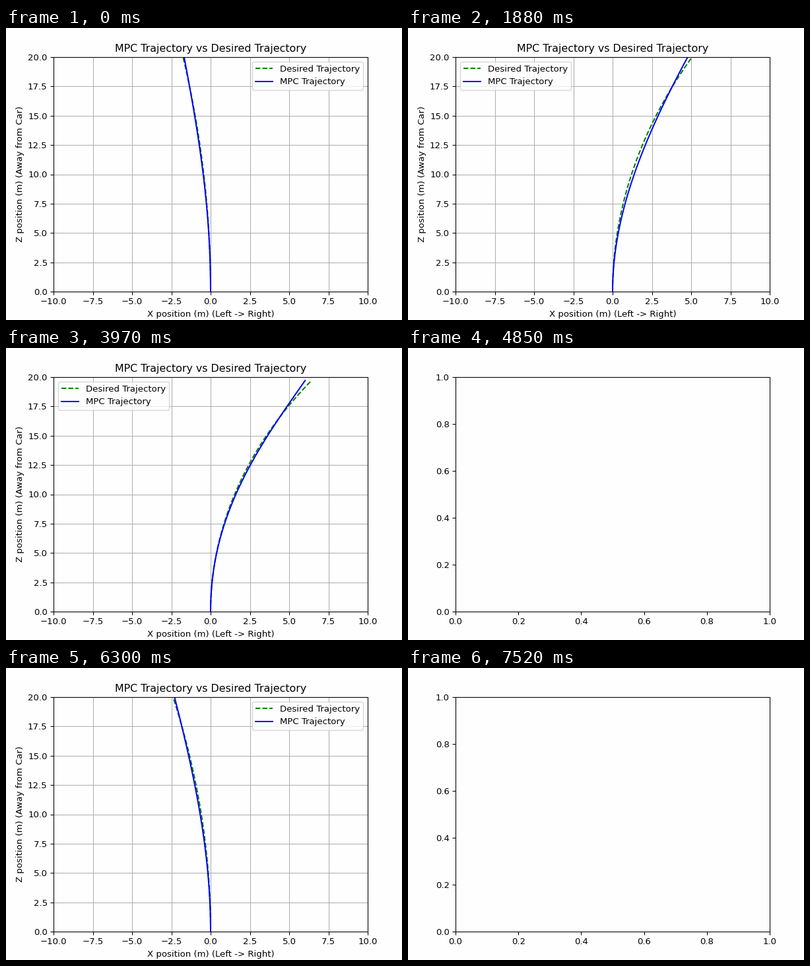
A matplotlib script for the animation above (7.55 s loop, 600 by 442 pixels).

```python
import numpy as np
import matplotlib.pyplot as plt
from matplotlib.animation import FuncAnimation

W, H, DPI = 600, 442, 96
LOOP, STEP = 7550, 25
BACK = "#fefefe"
BLANK = 30          # ms the cleared axes stay visible
LENGTH = 20.94      # metres of path shown

plt.rcParams.update({"font.family": "DejaVu Sans", "font.size": 9.9,
                     "axes.facecolor": BACK, "figure.facecolor": BACK})

# Redraw bursts: start, end, number of switches, first state, last state
BURSTS = [
    (90, 760, 14, 0, 1), (850, 1550, 13, 0, 1), (1640, 2390, 15, 0, 1),
    (2480, 3210, 13, 0, 0), (3240, 3970, 13, 1, 1), (4000, 4730, 13, 0, 0),
    (4790, 5450, 13, 1, 1), (5550, 6300, 15, 0, 1), (6360, 7090, 16, 0, 1),
    (7180, 7520, 9, 0, 0),
]

# Path curvature over time (s, 1/m), level at both ends
KEY_T = np.array([0, 1.88, 2.91, 3.97, 6.30, 7.55])
KEY_K = np.array([-0.0087, 0.0237, 0.0419, 0.0299, -0.0118, -0.0130])
KEY_D = np.gradient(KEY_K, KEY_T)
KEY_D[[0, -1]] = 0


def curvature(t):
    """Smooth cubic Hermite through the key curvatures."""
    i = min(np.searchsorted(KEY_T, t, side="right") - 1, len(KEY_T) - 2)
    h = KEY_T[i + 1] - KEY_T[i]
    u = (t - KEY_T[i]) / h
    return ((1 + 2 * u) * (1 - u) ** 2 * KEY_K[i]
            + u * (1 - u) ** 2 * h * KEY_D[i]
            + u * u * (3 - 2 * u) * KEY_K[i + 1]
            + u * u * (u - 1) * h * KEY_D[i + 1])


def build_schedule():
    """List of (time, shown): plots alternate with short cleared views."""
    events = [(0, 1)]
    for start, end, n, first, last in BURSTS:
        states = [(first + j) % 2 for j in range(n - 1)]
        shown = sum(states)
        hold = (end - start - BLANK * (n - 1 - shown)) / shown
        t = start
        for s in states:
            events.append((t, s))
            t += hold if s else BLANK
        events.append((end, last))
    return events


def arc(k, s, off=0):
    """Points along a circular arc, pushed sideways by off."""
    a = k * s
    return ((1 - np.cos(a)) / k + off * np.cos(a),
            np.sin(a) / k - off * np.sin(a))


def paths(t):
    """Desired arc, and the controller's path that cuts across it."""
    k = curvature(t)
    rate = (curvature(t + 0.01) - k) / 0.01
    if abs(k) < 1e-6:
        k = 1e-6
    s = np.linspace(0, LENGTH, 41)
    r = s * 0.995
    off = (0.0017 * k * r ** 2.5 * (17.6 - r)
           + 3.1e-4 * rate * (r * (LENGTH - r)) ** 2)
    return arc(k, s), arc(k, r, off)


fig = plt.figure(figsize=(W / DPI, H / DPI), dpi=DPI)
rect = [72 / W, 43 / H, 476 / W, 355 / H]
empty = fig.add_axes(rect)
ax = fig.add_axes(rect)

desired, = ax.plot([], [], "g--", label="Desired Trajectory")
mpc, = ax.plot([], [], "b-", label="MPC Trajectory")
ax.set(xlim=(-10, 10), ylim=(0, 20),
       title="MPC Trajectory vs Desired Trajectory",
       xlabel="X position (m) (Left -> Right)",
       ylabel="Z position (m) (Away from Car)")
ax.grid(True)
ax.legend(loc="best")

EVENTS = build_schedule()
TIMES = np.array([t for t, _ in EVENTS])


def update(i):
    now = i * STEP + 20
    t, shown = EVENTS[np.searchsorted(TIMES, now, side="right") - 1]
    ax.set_visible(bool(shown))
    empty.set_visible(not shown)
    if shown:
        want, got = paths(t / 1000)
        desired.set_data(*want)
        mpc.set_data(*got)
    return desired, mpc


anim = FuncAnimation(fig, update, frames=LOOP // STEP, interval=STEP,
                     init_func=lambda: update(0), repeat=True, repeat_delay=0)
plt.show()
```
